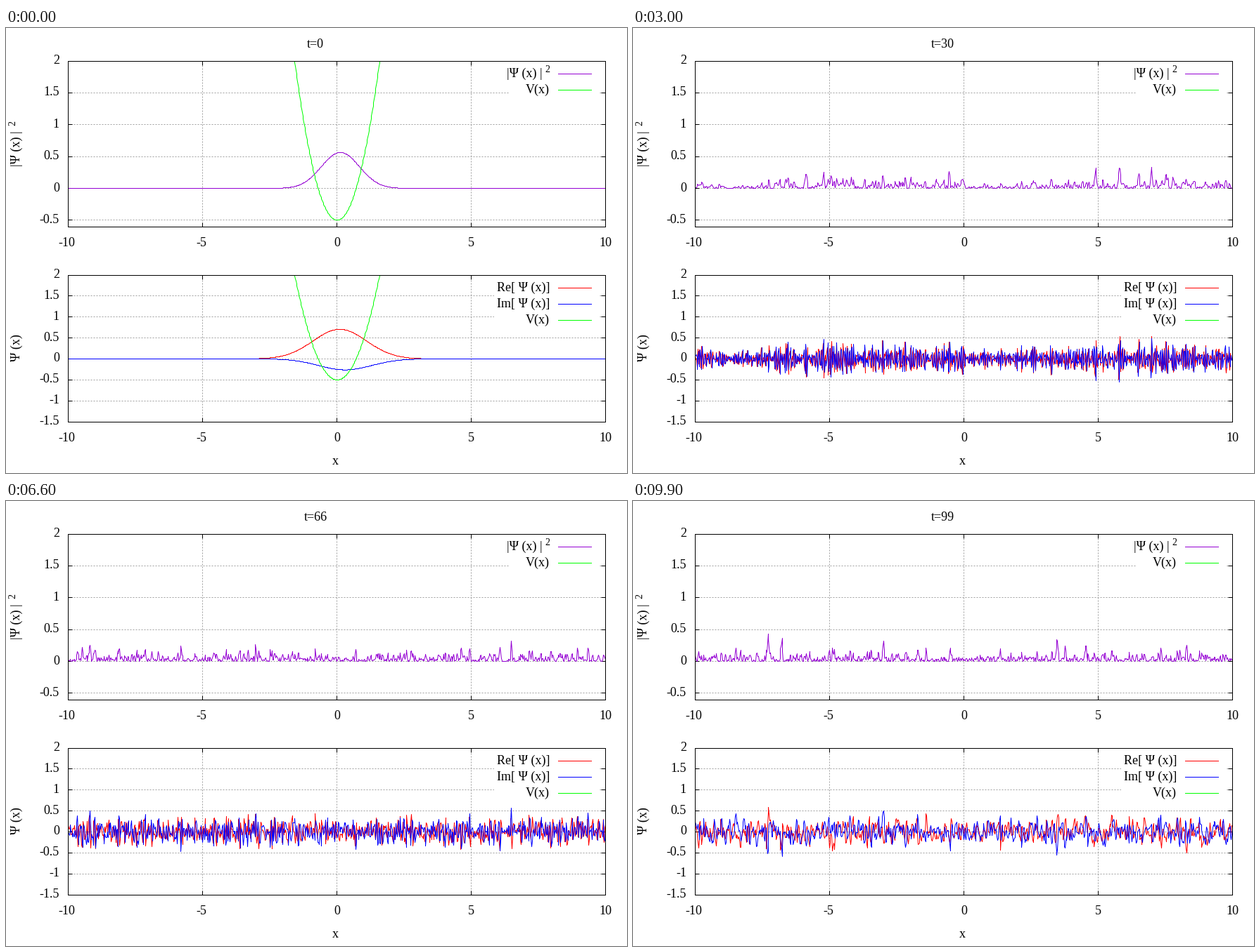
Animation, 883 px wide and 634 px high, one loop 10 s. Source, as a matplotlib script:

```python
import numpy as np
import matplotlib.pyplot as plt
from matplotlib.animation import FuncAnimation
from matplotlib.patches import Rectangle
from matplotlib.transforms import Affine2D

W, H, DPI = 883, 634, 64
PT = 72 / DPI  # points per pixel
FRAMES = 100
N = 1024
VIOLET, GREEN, RED, BLUE = "#9400d3", "#00ff00", "#ff0000", "#0000ff"

plt.rcParams["font.family"] = "Liberation Serif"
fig = plt.figure(figsize=(W / DPI, H / DPI), dpi=DPI, facecolor="white")
PX = Affine2D().scale(1 / W, -1 / H).translate(0, 1) + fig.transFigure


def text(x, y, s, size=18, ha="center", va="center", **kw):
    return fig.text(x, y, s, transform=PX, fontsize=size * PT, ha=ha, va=va, **kw)


def panel(top, bottom, ymin, yticks):
    """Framed plot area between two pixel rows, with labelled ticks."""
    left, right = 88.48, 852.48  # just under half, so that edges snap to these pixels
    top, bottom = top + .52, bottom + .52
    ax = fig.add_axes([left / W, 1 - bottom / H, (right - left) / W, (bottom - top) / H])
    ax.set(xlim=(-10, 10), ylim=(ymin, 2), xticks=range(-10, 11, 5), yticks=yticks)
    ax.set_axisbelow(True)
    ax.tick_params(direction="in", length=6 * PT, width=PT, top=True, right=True,
                   labelbottom=False, labelleft=False)
    ax.grid(color="#a0a0a0", lw=PT, ls=(0, (2, 2)))
    for spine in ax.spines.values():
        spine.set_linewidth(PT)
    for v in ax.get_xticks():
        text(left + (v + 10) / 20 * (right - left) - 2 * (v < 0), bottom + 23.5, f"{v:g}")
    for v in yticks:
        text(76, bottom - (v - ymin) / (2 - ymin) * (bottom - top), f"{v:g}", ha="right")
    return ax


def curve(ax, color):
    return ax.plot([], [], color=color, lw=PT, snap=True)[0]


def key(ax, left, top, bottom, entries):
    ax.add_patch(Rectangle((left, top), 843 - left, bottom - top, fc="white", ec="none",
                           transform=PX, zorder=1.5))
    for y, name, color in entries:
        ax.plot([785.48, 832.48], [y + .52] * 2, color=color, lw=PT, transform=PX, snap=True)
        text(773, y + 6, name, ha="right", va="baseline")


def density_name(x, y, dx, dy, **kw):
    """Label of the density, with its exponent shifted by (dx, dy)."""
    text(x, y, "|Ψ (x) |", va="baseline", **kw)
    text(x + dx, y + dy, "2", 14, va="baseline", **kw)


dens_ax = panel(46, 282, -0.6, np.arange(-0.5, 2.1, 0.5))
wave_ax = panel(351, 560, -1.5, np.arange(-1.5, 2.1, 0.5))
key(dens_ax, 716, 52, 99, [(64, "", VIOLET), (87, "V(x)", GREEN)])
key(wave_ax, 694, 357, 427, [(369, "Re[ Ψ (x)]", RED), (392, "Im[ Ψ (x)]", BLUE),
                             (415, "V(x)", GREEN)])

upright = dict(rotation=90, rotation_mode="anchor", ha="left")
density_name(763, 70, 10, -7, ha="right")
density_name(20, 197, -7, -58, **upright)
text(20, 475, "Ψ (x)", va="baseline", **upright)
text(468, 618, "x")
title = text(440, 28, "t=0", va="baseline")

dens = curve(dens_ax, VIOLET)
re, im = curve(wave_ax, RED), curve(wave_ax, BLUE)
traps = [curve(dens_ax, GREEN), curve(wave_ax, GREEN)]

x = np.linspace(-10, 10, N)
modes = np.fft.fftfreq(N, 1 / N)
rng = np.random.default_rng(7)
noise = rng.normal(size=N) + 1j * rng.normal(size=N)


def ramp(t, start, end, a=0, b=1):
    """Go from a to b between two times."""
    return np.interp(t, [start, end], [a, b])


def gauss(d, s):
    return np.exp(-d**2 / (2 * s**2)) / (s * np.sqrt(2 * np.pi))


def speckle(t):
    """Dispersing random wave of unit mean intensity."""
    width = ramp(t, 10, 50, 16, 34) * 20 / (2 * np.pi)
    f = np.fft.ifft(noise * np.exp(-modes**2 / (4 * width**2) - 0.0013j * modes**2 * t))
    return f / np.sqrt(np.mean(abs(f)**2))


def envelope(t, d):
    """Mean density: a packet that sheds a part ahead, then fills the ring."""
    ahead = ramp(t, 10, 15, 0, .2)
    even = ramp(t, 14, 27)**2
    packet = (1 - ahead) * gauss(d, ramp(t, 8, 15, .7071, 1.4)) + ahead * gauss(d - 5, 1.2)
    swell = .6 * np.exp(-(max(t - 30, 0) / 25)**2)
    spread = .05 * (1 + swell * np.cos(2 * np.pi * (x - 6.3 - .29 * (t - 30)) / 10))
    return (1 - even) * packet + even * spread


def wave(t):
    centre = .12 + t + .2265 * max(t - 8, 0)**2
    d = (x - centre + 10) % 20 - 10
    mix = ramp(t, 6, 22)
    field = (1 - mix + mix * speckle(t)) / np.hypot(1 - mix, mix)
    # momentum builds up, then folds back and forth on the grid
    k = min(t / 15, 1)**3 * (62 - 38 * np.cos(2 * np.pi * (t - 57) / 40)) - .066
    return np.sqrt(envelope(t, d)) * field * np.exp(1j * (k * d - .35 - .8 * t))


def update(t):
    psi = wave(t)
    dens.set_data(x, abs(psi)**2)
    re.set_data(x, psi.real)
    im.set_data(x, psi.imag)
    for line in traps:
        line.set_data(x, (x - t)**2 - .5)
    title.set_text(f"t={t}")
    return [dens, re, im, *traps, title]


anim = FuncAnimation(fig, update, frames=FRAMES, interval=100, repeat=True, repeat_delay=0)
plt.show()
```
